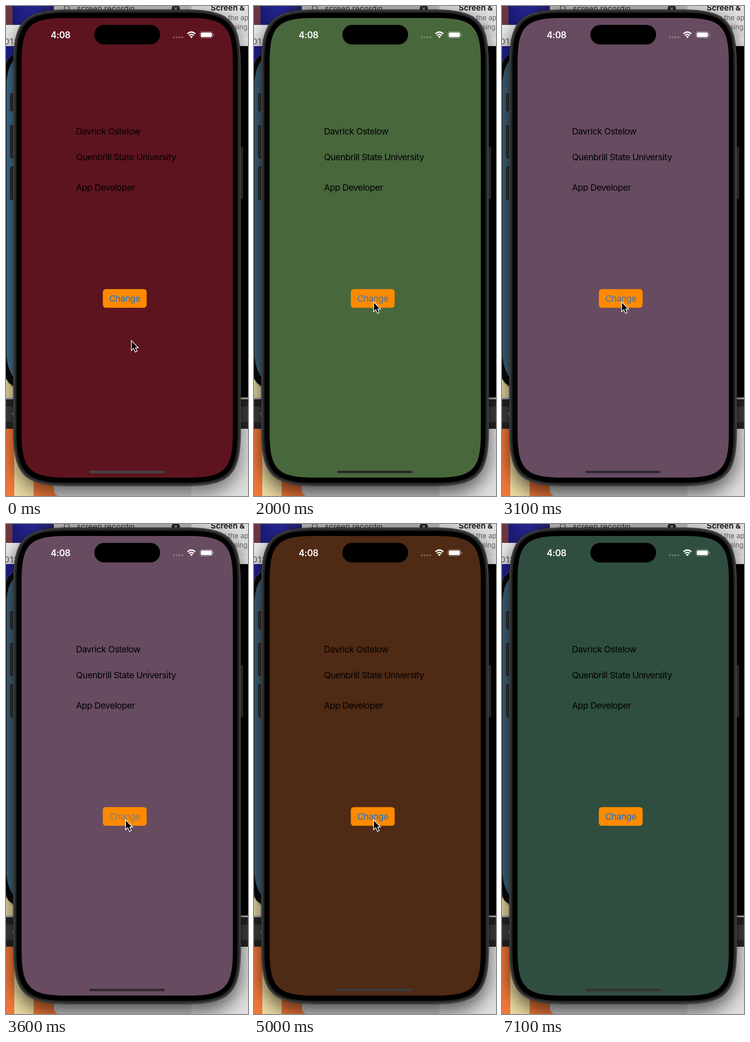
These frames come from a looping animation (526x1064 px, 7.2 s). An HTML page:

```html
<!DOCTYPE html>
<html lang="en">
<head>
<meta charset="utf-8">
<title>Colour changer</title>
<style>
html, body { margin: 0; width: 100%; height: 100%; overflow: hidden; background: #000; }
svg { display: block; width: 526px; height: 1064px; }
text { font-family: Inter, "Liberation Sans", sans-serif; }
.label { font-size: 19.2px; letter-spacing: -.5px; }
</style>
</head>
<body>
<svg viewBox="0 0 526 1064">
  <defs>
    <linearGradient id="sky" x2="1" y2="0">
      <stop stop-color="#1b1b78"/><stop offset=".5" stop-color="#272797"/><stop offset="1" stop-color="#202068"/>
    </linearGradient>
    <filter id="blur" x="-20%" y="-20%" width="140%" height="140%"><feGaussianBlur stdDeviation="20"/></filter>
  </defs>

  <!-- desktop and windows behind the phone -->
  <rect width="14" height="42" fill="#6c363f"/>
  <rect x="14" width="90" height="60" fill="url(#sky)"/>
  <rect x="104" width="299" height="60" fill="#b8b8b8"/>
  <rect x="403" width="123" height="87" fill="#dedede"/>
  <g fill="none" stroke="#333" stroke-width="1.4">
    <circle cx="132" cy="5" r="5.5"/><path d="M136 9l5 5"/>
  </g>
  <text x="154" y="12" font-size="17" fill="#2d2d2d">screen recordin</text>
  <circle cx="369" cy="6" r="9" fill="#252525"/>
  <path d="M366 3l6 6m0-6l-6 6" stroke="#aaa" stroke-width="1.5"/>
  <text x="445" y="10" font-size="17" font-weight="700" fill="#222">Screen &amp;</text>
  <g font-size="15" fill="#666" text-anchor="end">
    <text x="527" y="31">w the ap</text>
    <text x="525" y="51">sing</text>
  </g>
  <rect x="490" y="68" width="36" height="19" fill="#e8e8e8"/>

  <rect y="41" width="40" height="46" fill="#ececec"/>
  <text x="-5" y="84" font-size="19" font-weight="700" fill="#8d8d8d">01:</text>
  <rect y="87" width="40" height="50" fill="#202090"/>
  <rect y="760" width="40" height="91" fill="#e0d49f"/>
  <path d="M40 96Q2 107-3 130V800Q0 822 40 838Z" fill="#090909"/>
  <path d="M20 100Q1 110-1 132M-1 798Q1 821 20 831" fill="none" stroke="#555"/>
  <path id="rear" d="M40 104Q5 112 1 165V760Q5 809 40 827Z"/>

  <rect x="490" y="87" width="36" height="763" fill="#000"/>
  <rect y="850" width="526" height="5" fill="#a8a8a8"/>
  <rect y="854" width="526" height="64" fill="#252525"/>
  <path d="M0 870H40V903H0ZM490 870H526V903H490Z" fill="#3c3c3c"/>
  <path d="M13 885l2-2v5" fill="none" stroke="#ccc"/>
  <rect y="918" width="130" height="146" fill="#f0783a"/>
  <rect x="18" y="918" width="42" height="146" fill="#ecdca2"/>
  <path d="M104 918H403V1064H113Q104 1060 104 1050Z" fill="#cdcdcd"/>
  <rect x="403" y="918" width="123" height="146" fill="#dfdfdf"/>
  <rect id="shadow" x="17" y="22" width="492" height="1036" rx="80" filter="url(#blur)"/>

  <!-- phone -->
  <g fill="#272727" stroke="#111">
    <rect x="9.500" y="190" width="10" height="38" rx="2"/>
    <rect x="9.500" y="259" width="10" height="71" rx="2"/>
    <rect x="9.500" y="349" width="10" height="71" rx="2"/>
    <rect x="506" y="306" width="9.500" height="113" rx="2"/>
  </g>
  <path id="rim" fill="#141414"/>
  <path id="frame" fill="#292929" stroke="#626262" stroke-width="1.2"/>
  <path id="bezel" fill="#000" stroke="#171717"/>
  <path id="screen"/>
  <rect x="192" y="41" width="143" height="42.500" rx="21.200" fill="#000"/>
  <text x="97" y="70" font-size="19.500" font-weight="600" letter-spacing="-.4" fill="#fff">4:08</text>
  <path d="M365 68h19" stroke="#fff" stroke-opacity=".25" stroke-width="4.400" stroke-linecap="round" stroke-dasharray="0 6.100"/>
  <path d="M394.500 60.500Q403 52.500 411.500 60.500M397.700 64.200Q403 59.200 408.300 64.200" fill="none" stroke="#fff" stroke-width="2.700"/>
  <path d="M399.800 66.500Q403 63.700 406.200 66.500L403 69.800Z" fill="#fff"/>
  <rect x="421.700" y="55.700" width="27.600" height="13.600" rx="4.300" fill="none" stroke="#fff" stroke-opacity=".4" stroke-width="1.200"/>
  <rect x="423.500" y="57.500" width="24" height="10" rx="2.800" fill="#fff"/>
  <path d="M450.700 60v5q1.600-.7 1.600-2.500t-1.600-2.500" fill="#fff" fill-opacity=".45"/>

  <g class="label">
    <text x="152" y="279">Davrick Ostelow</text>
    <text x="152" y="335">Quenbrill State University</text>
    <text x="152" y="401">App Developer</text>
    <rect x="210.500" y="614.700" width="95.200" height="40.600" rx="6.500" fill="#ff8a00"/>
    <text id="change" x="258.300" y="642" text-anchor="middle" fill="#176fd1">Change</text>
  </g>
  <rect id="home" x="181" y="1009" width="164" height="5.500" rx="2.750"/>
  <path id="cursor" d="M0 0V21.500L4.800 17 8.500 25 12.200 23.400 8.900 15.600H15Z" fill="#000" stroke="#fff" stroke-width="1.500"/>
</svg>
<script>
const LOOP = 7200, STEP = 100;
const el = id => document.getElementById(id);
const set = (id, key, value) => el(id).setAttribute(key, value);

// rectangle whose corners ease gradually into the sides
function smoothRect(x, y, w, h, r) {
  const e = r * 1.5, c = r * .28, a = e - c;
  return `M${x} ${y + e}c0 ${-a} ${c} ${-e} ${e} ${-e}`.replace(`${c} ${-e} ${e}`, `${c} ${-a} ${e}`)
    && `M${x} ${y + e}C${x} ${y + c} ${x + c} ${y} ${x + e} ${y}`
    + `H${x + w - e}C${x + w - c} ${y} ${x + w} ${y + c} ${x + w} ${y + e}`
    + `V${y + h - e}C${x + w} ${y + h - c} ${x + w - c} ${y + h} ${x + w - e} ${y + h}`
    + `H${x + e}C${x + c} ${y + h} ${x} ${y + h - c} ${x} ${y + h - e}Z`;
}
set("rim", "d", smoothRect(15.5, 7.5, 495, 1035, 82));
set("frame", "d", smoothRect(17, 9, 492, 1032, 80.5));
set("bezel", "d", smoothRect(22.5, 14.5, 481, 1021, 75));
set("screen", "d", smoothRect(34, 26, 459, 998, 64));

// click time, screen colour, home bar colour
const states = [
  [-1000, "#5d141f", "#454444"],
  [600, "#2a1520", "#454345"],
  [1900, "#48673c", "#2a2a2a"],
  [3000, "#674b61", "#302c30"],
  [3700, "#4f2a14", "#3d3c3c"],
  [5700, "#115138", "#3a3135"],
  [6700, "#304e3f", "#333333"]
];

const ease = (t, from, to) => {
  const p = Math.min(1, Math.max(0, (t - from) / (to - from)));
  return p * p * (3 - 2 * p);
};

function draw(t) {
  const [clicked, colour, bar] = states.findLast(s => t >= s[0]);
  const pressed = states.some(s => s[0] - t > 0 && s[0] - t <= STEP);
  const focused = t >= 600;
  set("screen", "fill", colour);
  set("home", "fill", bar);
  set("change", "opacity", pressed ? .5 : Math.min(1, .5 + (t - clicked) * .003));
  set("rear", "fill", focused ? "#3d6178" : "#3d6a86");
  set("shadow", "opacity", focused ? .62 : .5);

  const arrive = ease(t, 0, 500), leave = ease(t, 6700, 7000);
  const x = 272.5 - 12.5 * arrive - 40 * leave;
  const y = 726.5 - 84 * arrive + 440 * leave;
  set("cursor", "transform", `translate(${x} ${y})`);
}

function tick(now) {
  draw(Math.floor((now % LOOP) / STEP) * STEP);
  requestAnimationFrame(tick);
}
draw(0);
requestAnimationFrame(tick);
</script>
</body>
</html>
```
